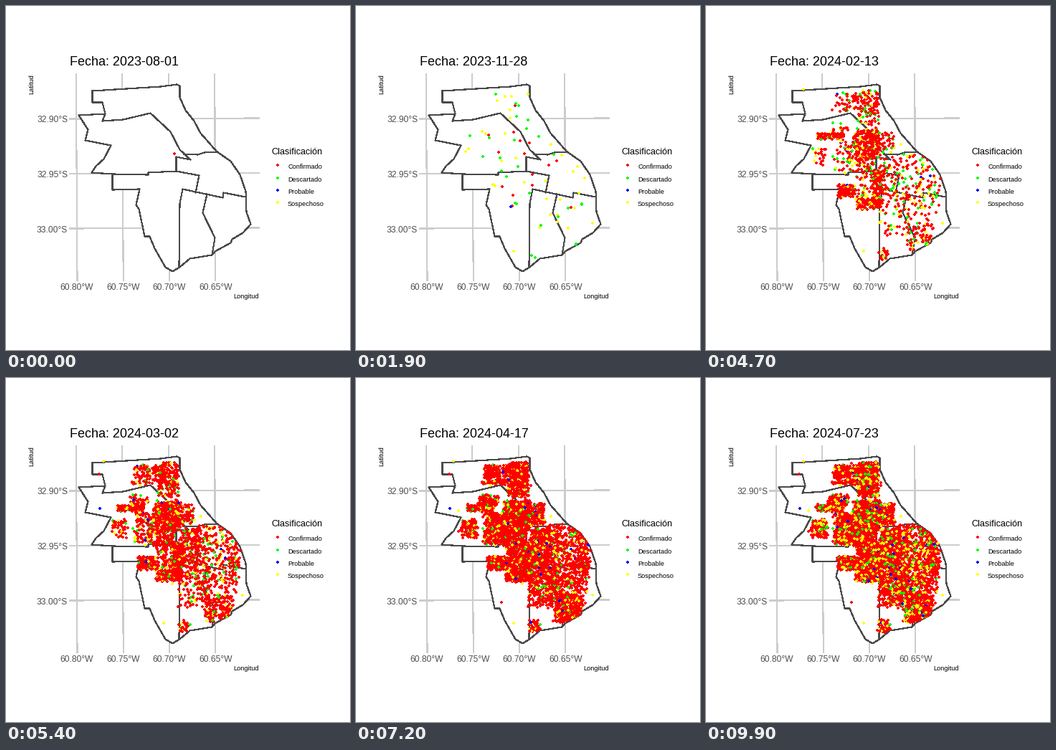
A matplotlib script that plays this animation: 480 px wide and 480 px high, repeating every 10 s.

```python
import numpy as np
import matplotlib.pyplot as plt
from matplotlib.animation import FuncAnimation
from matplotlib.colors import to_rgba_array
from matplotlib.path import Path

SIZE, DPI, FRAMES = 480, 72, 100
COLORS = ["#FF0000", "#00FF00", "#0000FF", "#FFFF00"]
LABELS = ["Confirmado", "Descartado", "Probable", "Sospechoso"]
RED, GREEN, BLUE, YELLOW = range(4)

plt.rcParams["font.family"] = "Liberation Sans"
rng = np.random.default_rng(12)

# District map
COAST = [(120, 118), (215, 112), (238, 109), (242, 111), (242, 127), (250, 145),
         (262, 160), (271, 177), (294, 203), (313, 216), (326, 235), (334, 258),
         (335, 287), (341, 304), (330, 316), (315, 325), (313, 330), (291, 342),
         (287, 347), (256, 352), (243, 363), (232, 370)]
INLAND = [(222, 364), (207, 338), (200, 321), (193, 321), (185, 283), (181, 277),
          (186, 255), (148, 256), (148, 234), (119, 232), (125, 223), (136, 213),
          (146, 194), (110, 187), (114, 172), (101, 152), (138, 150), (134, 134),
          (120, 134), (120, 118)]
OUTLINE = COAST + INLAND
BORDERS = [
    [(138, 150), (134, 160), (163, 158), (201, 149), (229, 175), (242, 200),
     (257, 214), (237, 210), (237, 230)],
    [(248, 206), (267, 207), (276, 204), (294, 203)],
    [(148, 234), (198, 235), (198, 232), (237, 230), (269, 236), (264, 260)],
    [(241, 362), (242, 275), (246, 255), (302, 267), (303, 260), (334, 266)],
    [(280, 262), (274, 288), (291, 323), (287, 347)],
]

# Cases of the first months
FIRST = {
    RED: [(222, 139), (185, 180), (220, 176), (242, 191), (199, 204), (280, 216),
          (269, 222), (246, 235), (246, 250), (219, 264), (218, 279), (300, 281)],
    GREEN: [(223, 136), (224, 154), (221, 187), (177, 210), (201, 212), (276, 207),
            (203, 230), (210, 238), (204, 252), (242, 261), (224, 276), (258, 306),
            (250, 351), (296, 282), (315, 276)],
    YELLOW: [(197, 132), (215, 156), (157, 199), (272, 193), (287, 208), (309, 224),
             (303, 231), (319, 240), (266, 269), (281, 301), (296, 310), (330, 303),
             (220, 342)],
}
# x, y, time, class
SINGLES = [
    (235, 206, 0, RED), (216, 280, 18, BLUE), (183, 123, 30, BLUE),
    (240, 123, 32, BLUE), (245, 258, 33, BLUE), (136, 116, 36, YELLOW),
    (189, 190, 44, BLUE), (313, 237, 45, BLUE), (130, 134, 49, RED),
    (131, 182, 52, BLUE), (203, 313, 61, RED), (143, 185, 70, YELLOW),
]
# x0, x1, y0, y1, cases before and after mid February
ZONES = [
    (178, 222, 122, 148, 45, 150), (212, 240, 118, 165, 85, 280),
    (155, 192, 179, 184, 110, 120), (172, 198, 164, 178, 10, 90),
    (148, 168, 198, 222, 14, 80), (180, 212, 188, 232, 45, 300),
    (208, 242, 172, 212, 210, 350), (225, 262, 175, 205, 55, 200),
    (184, 208, 250, 266, 100, 170), (210, 245, 267, 283, 130, 160),
    (210, 236, 212, 266, 60, 260), (233, 246, 230, 276, 150, 120),
    (245, 268, 212, 280, 55, 300), (265, 326, 205, 265, 80, 360),
    (266, 322, 262, 300, 45, 210), (277, 316, 302, 341, 60, 300),
    (240, 276, 282, 318, 20, 110), (242, 256, 338, 355, 10, 30),
]
# start, end, skew, factors of both zone counts, share of each class
WAVES = [
    (8, 19, 0.7, 0, .008, (.1, .5, 0, .4)),
    (19, 34, 0.7, .09, .035, (.29, .29, .005, .415)),
    (34, 47, 0.6, 1, 0, (.85, .05, .003, .097)),
    (47, 63, 0.9, 0, 1, (.875, .03, .01, .085)),
    (63, 72, 1.0, 0, .32, (.83, .045, .01, .115)),
    (72, 99, 1.5, 0, .34, (.66, .09, .02, .23)),
]


def build_cases():
    rows = list(SINGLES)
    for cls, places in FIRST.items():
        for x, y in places:
            late = x < 183 or x > 304 or y > 343
            rows.append((x, y, rng.integers(12 if late else 1, 20), cls))
    land = Path(OUTLINE)
    for start, end, skew, f0, f1, share in WAVES:
        for x0, x1, y0, y1, n0, n1 in ZONES:
            n = rng.poisson(f0 * n0 + f1 * n1)
            x = rng.uniform(x0, x1, n) + rng.normal(0, 1.5, n)
            y = rng.uniform(y0, y1, n) + rng.normal(0, 1.5, n)
            t = np.ceil(start + (end - start) * (1 - rng.random(n)) ** skew)
            cls = rng.choice(4, n, p=share)
            block = np.column_stack([x, y, t, cls])
            rows += list(block[land.contains_points(block[:, :2])])
    cases = np.array(rows, float)
    return cases[np.argsort(cases[:, 2], kind="stable")]


cases = build_cases()
spots = np.round(cases[:, :2])
times = cases[:, 2]
tints = to_rgba_array(COLORS)[cases[:, 3].astype(int)]

fig = plt.figure(figsize=(SIZE / DPI, SIZE / DPI), dpi=DPI, facecolor="white")
ax = fig.add_axes([0, 0, 1, 1])
ax.set_xlim(0, SIZE)
ax.set_ylim(SIZE, 0)
ax.axis("off")

# 4 px disc with cut corners
QUARTER = np.array([(2, -1), (2, 1), (1, 1)])
TURN = np.array([(0, 1), (-1, 0)])
DISC = np.vstack([QUARTER @ np.linalg.matrix_power(TURN, k) for k in range(4)]
                 + [QUARTER[:1]])


def line(points, color, z):
    x, y = np.array(points, float).T + 0.5
    ax.plot(x, y, color=color, lw=1.15, antialiased=False, zorder=z)


def label(x, y, text, size, color="black", **kw):
    return ax.text(x, y, text, fontsize=size, color=color, **kw)


def dots(xy, color):
    x, y = np.asarray(xy, float).T
    return ax.scatter(x, y, s=16, c=color, marker=Path(DISC), linewidths=0, zorder=5)


for i in range(4):
    x = 97.3 + 64.5 * i
    line([(x, 95), (x + 1.7 - 0.3 * i, 382)], "#CCCCCC", 1)
    label(99 + 64.5 * i, 396, f"60.{80 - 5 * i}°W", 12, "#4D4D4D", ha="center")
for i in range(3):
    y = 157 + 76.5 * i
    line([(89, y), (352, y - 1)], "#CCCCCC", 1)
    label(86, y + 5.5, f"{32.9 + 0.05 * i:.2f}°S", 12, "#4D4D4D", ha="right")

ax.fill(*(np.array(OUTLINE, float).T + 0.5), color="white", lw=0, zorder=2)
for path in [OUTLINE] + BORDERS:
    line(path, "#4A4A4A", 3)

title = label(89, 83, "", 18)
label(353, 408, "Longitud", 9.2, ha="right")
label(38, 95, "Latitud", 9.2, rotation=90, ha="right", va="baseline",
      rotation_mode="anchor")
label(370, 207, "Clasificación", 12.6)
for i, name in enumerate(LABELS):
    y = 222 + 17 * i + (i > 0)
    dots([(379, y)], COLORS[i])
    label(393, y + 5, name, 9.2)

cloud = dots(spots[:1], tints[:1])

START = np.datetime64("2023-08-01")
DAY_KNOTS = [(0, 0), (7, 70), (19, 119), (34, 163), (47, 196), (63, 237),
             (72, 260), (88, 307), (99, 357)]
STEPS, DAYS = zip(*DAY_KNOTS)


def update(frame):
    day = int(round(float(np.interp(frame, STEPS, DAYS))))
    title.set_text(f"Fecha: {START + day}")
    n = np.searchsorted(times, frame, side="right")
    cloud.set_offsets(spots[:n])
    cloud.set_facecolors(tints[:n])
    return title, cloud


anim = FuncAnimation(fig, update, frames=FRAMES, interval=100, blit=False,
                     repeat=True, repeat_delay=0)
plt.show()
```
